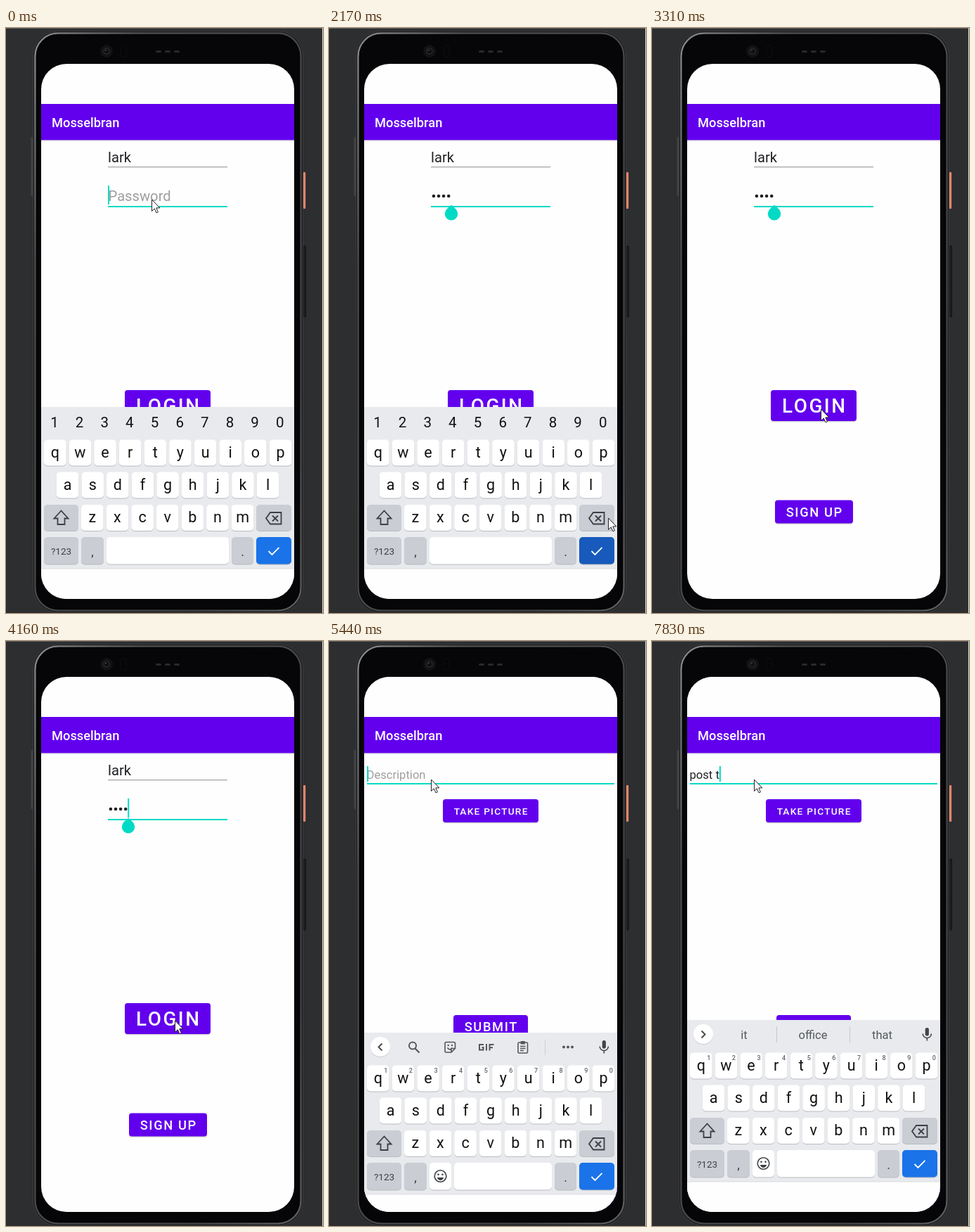
An HTML page that plays this animation: 451 by 832 pixels, repeating every 7.99 s.

```html
<!DOCTYPE html>
<html lang="en">
<head>
<meta charset="utf-8">
<title>Phone login and post</title>
<style>
  html, body { margin: 0; width: 100%; height: 100%; overflow: hidden; background: #2d2e30; }
  svg { display: block; width: 451px; height: 832px; }
  text { font-family: Roboto, "Noto Sans", sans-serif; white-space: pre; }
</style>
</head>
<body>
<svg id="stage" viewBox="0 0 451 832" xmlns="http://www.w3.org/2000/svg">
  <defs>
    <clipPath id="glass"><rect x="50" y="51" width="360" height="761" rx="36"/></clipPath>
    <linearGradient id="rim" x1="0" x2="1" y1="0" y2="1">
      <stop offset="0" stop-color="#8a8b8d"/><stop offset=".2" stop-color="#4c4d4f"/>
      <stop offset=".8" stop-color="#414244"/><stop offset="1" stop-color="#5c5d5f"/>
    </linearGradient>
    <linearGradient id="shade" x1="0" x2="0" y1="0" y2="1">
      <stop offset="0" stop-color="#000" stop-opacity=".14"/><stop offset="1" stop-color="#000" stop-opacity="0"/>
    </linearGradient>
  </defs>
</svg>
<script>
const LOOP = 7990;
const PURPLE = '#6200ee', TEAL = '#03dac5', INK = '#202124', ICON = '#3c4043';
const stage = document.getElementById('stage');

function el(parent, tag, attrs = {}, text) {
  const node = document.createElementNS('http://www.w3.org/2000/svg', tag);
  for (const k in attrs) node.setAttribute(k, attrs[k]);
  if (text !== undefined) node.textContent = text;
  parent.appendChild(node);
  return node;
}
const group = (p, attrs) => el(p, 'g', attrs);
const rect = (p, x, y, width, height, fill, rx = 0, more = {}) =>
  el(p, 'rect', { x, y, width, height, fill, rx, ...more });
const disc = (p, cx, cy, r, fill) => el(p, 'circle', { cx, cy, r, fill });
const line = (p, d, stroke = ICON, width = 1.8) =>
  el(p, 'path', { d, fill: 'none', stroke, 'stroke-width': width });
const label = (p, x, y, size, fill, text, more = {}) =>
  el(p, 'text', { x, y, 'font-size': size, fill, ...more }, text);
const centered = (p, x, y, size, fill, text, more = {}) =>
  label(p, x, y, size, fill, text, { 'text-anchor': 'middle', ...more });
const show = (node, on) => node.setAttribute('visibility', on ? 'inherit' : 'hidden');

// Phone body
function ring(inset, stroke, width, fill = 'none') {
  rect(stage, 38 + inset, 4 + inset, 385 - 2 * inset, 828 - 2 * inset, fill, 36 - inset,
    { stroke, 'stroke-width': width });
}
function drawPhone() {
  rect(stage, 0, 0, 451, 832, '#2d2e30');
  rect(stage, 0, 0, 451, 1, '#5d5e60');
  rect(stage, 450, 0, 1, 832, '#d8d8d8');
  rect(stage, 35.5, 155, 2.5, 84, '#424345', 1);
  rect(stage, 423, 205, 3.2, 52, '#e2846b', 1);
  rect(stage, 423, 310, 3.5, 101, '#1f1f21', 1, { stroke: '#121213' });
  ring(.5, '#3b3c3e', 1, '#1a1a1b');
  ring(3.5, 'url(#rim)', 2.5);
  ring(5.5, '#050506', 1.5, '#060608');
  disc(stage, 143, 33, 9, '#121213');
  disc(stage, 143, 33, 5, '#232427');
  disc(stage, 143, 33, 3, '#0b0b0d');
  disc(stage, 142, 32, 1, '#4b4d51');
  rect(stage, 163, 25, 8, 16, 'none', 3, { stroke: '#0f0f11' });
  for (let i = 0; i < 3; i++) rect(stage, 213 + i * 13, 32, 8, 3, '#29292b', 1.5);
}

function button(p, x, y, w, h, size, text) {
  rect(p, x, y + 1.5, w, h, '#000', 4, { opacity: .16 });
  rect(p, x, y, w, h, PURPLE, 4);
  const gap = size * .0893;
  centered(p, x + w / 2 + gap / 2, y + h / 2 + size * .356 + .4, size, '#fff', text,
    { 'font-weight': 500, 'letter-spacing': gap });
}

function page() {
  const g = group(screen);
  rect(g, 50, 51, 360, 761, '#fefefe');
  rect(g, 50, 159, 360, 3, 'url(#shade)');
  rect(g, 50, 108, 360, 51.4, PURPLE);
  label(g, 65, 141, 18.3, '#fff', 'Mosselbran', { 'font-weight': 500 });
  return g;
}

drawPhone();
const screen = group(stage, { 'clip-path': 'url(#glass)' });

// Login page
const login = page();
label(login, 145, 190.5, 20.2, INK, 'lark');
rect(login, 145, 197, 170, 1.3, '#a6a6a6');
const passHint = label(login, 145.5, 246, 20.2, '#9e9e9e', 'Password');
const dots = [0, 1, 2, 3].map(i => disc(login, 148.9 + i * 7.1, 239, 2.3, INK));
rect(login, 145, 253, 170, 2, TEAL);
const passCaret = rect(login, 145, 224, 2, 27, TEAL);
button(login, 169, 515, 122, 44, 27.8, 'LOGIN');
button(login, 175, 671.4, 111, 33.2, 18.3, 'SIGN UP');
const ripple = rect(login, 169, 515, 122, 44, '#fff', 4, { opacity: .22 });
const handle = el(login, 'path', { d: 'M174 251.5 L180.4 257.6 A9.2 9.2 0 1 1 167.6 257.6 Z', fill: TEAL });

// Post page
const post = page();
const descHint = label(post, 53.5, 196, 16.6, '#777', 'Description');
const descText = label(post, 53.5, 196, 16.6, INK, '');
const composing = rect(post, 54, 199, 0, 1, INK);
rect(post, 54, 202, 352, 2, TEAL);
const descCaret = rect(post, 54, 178, 2, 22, TEAL);
button(post, 162, 225, 136, 33, 13.7, 'TAKE PICTURE');
button(post, 177, 532, 106, 33, 18.3, 'SUBMIT');
button(post, 319, 773, 92, 33.5, 12.9, 'LOG OUT');

// Keyboard
const board = group(screen);
const PITCH = 35.63;
rect(board, 50, 539, 360, 230, '#e8eaed');
rect(board, 50, 769, 360, 300, '#fefefe');
rect(board, 50, 768.5, 360, 1, '#dcdee1');

function key(p, x, y, w, h = 37, fill = '#fff') {
  rect(p, x, y + 1, w, h, '#b9bcc1', 5);
  return rect(p, x, y, w, h, fill, 5);
}
function row(chars, x, y) {
  [...chars].forEach((c, i) => {
    key(board, x + i * PITCH, y, 31.6);
    centered(board, x + 15.8 + i * PITCH, y + 25, 21.5, '#111', c);
  });
}
const GRAY = '#cacdd4';
row('qwertyuiop', 54, 585.5);
row('asdfghjkl', 71.8, 631.5);
row('zxcvbnm', 107, 678);
key(board, 54, 678, 49, 37, GRAY);
line(board, 'M78.5 686.5 L68.5 697.5 H73.5 V706 H83.5 V697.5 H88.5 Z');
key(board, 356, 678, 50, 37, GRAY);
line(board, 'M376 689 H391.5 V705.5 H376 L370 697.2 Z M379 693.5 L387 701.5 M387 693.5 L379 701.5');
key(board, 54, 724, 49, 38.5, GRAY);
centered(board, 78.5, 748.5, 13.5, ICON, '?123');
key(board, 107, 724, 32, 38.5, GRAY);
centered(board, 123, 751, 18, ICON, ',');
key(board, 321, 724, 31, 38.5, GRAY);
centered(board, 336.5, 751, 18, ICON, '.');
const enter = key(board, 356, 724, 50, 38.5, '#1a73e8');
line(board, 'M373.5 744 L378.5 749 L388.5 738.8', '#fff');

const digits = group(board);
const smart = group(board);
key(digits, 143, 724, 174, 38.5);
key(smart, 143, 724, 31, 38.5);
key(smart, 178, 724, 139, 38.5);
[...'1234567890'].forEach((c, i) => {
  centered(digits, 69 + i * PITCH, 568, 20.5, '#111', c);
  centered(smart, 80.7 + i * PITCH, 595.5, 9, '#5f6368', c, { 'font-weight': 500 });
});
el(smart, 'circle', { cx: 158.5, cy: 743, r: 8.3, fill: 'none', stroke: ICON, 'stroke-width': 1.6 });
disc(smart, 155.5, 740.8, 1.3, ICON);
disc(smart, 161.5, 740.8, 1.3, ICON);
el(smart, 'path', { d: 'M153.8 745 H163.2 Q161.8 749 158.5 749 T153.8 745 Z', fill: ICON });

rect(smart, 59, 546, 28, 28, '#c8cbd0', 14);
disc(smart, 73, 559, 14, '#fff');
const chevron = line(smart, '', '#444');
rect(smart, 388.7, 550, 5.2, 11.5, '#444', 2.6);
line(smart, 'M385.2 558.5 A6.1 6.1 0 0 0 397.4 558.5 M391.3 564.5 V568.5', '#444', 1.6);

const tools = group(smart);
const TOOL = '#54575b';
el(tools, 'circle', { cx: 119, cy: 557.5, r: 5, fill: 'none', stroke: TOOL, 'stroke-width': 2 });
line(tools, 'M122.5 561.5 L128.5 567.5', TOOL, 2.2);
line(tools, 'M167 552.5 H177.5 Q179.5 552.5 179.5 554.5 V561.5 L174 567 H167 Q165 567 165 565 V554.5 Q165 552.5 167 552.5 Z M168.5 560.5 Q172 565.5 175.5 560.5 M179.5 561.5 H174 V567', TOOL, 1.6);
disc(tools, 169.7, 557, 1.2, TOOL);
disc(tools, 175, 557, 1.2, TOOL);
line(tools, 'M220 556 H214 V563.5 H219.5 V560 H217.5 M224 555 V564.5 M228.5 564.5 V556 H234.5 M228.5 560.3 H233', TOOL, 2);
rect(tools, 269, 553, 13.5, 15, 'none', 1.5, { stroke: TOOL, 'stroke-width': 1.6 });
rect(tools, 272.5, 551, 6.5, 4.5, TOOL, 1);
line(tools, 'M272 558.5 H279.5 M272 561.5 H279.5 M272 564.5 H277', TOOL, 1.3);
line(tools, 'M307.5 549 V571', '#cdd0d4', 1);
[334, 340, 346].forEach(x => disc(tools, x, 559.5, 2, TOOL));

const words = group(smart);
line(words, 'M177.5 548 V571 M281.5 548 V571', '#c6c9cd', 1);
const guesses = [131, 229, 327.5].map(x => centered(words, x, 566, 16.5, '#55585c', ''));

// Mouse pointer
const mouse = el(stage, 'path', {
  d: 'M.5 .5 V17 L4.3 13.4 L7 19.4 L9.4 18.3 L6.8 12.4 H11.8 Z',
  fill: '#fff', stroke: '#222', 'stroke-width': 1
});

// The picture only changes on these beats: [first, last, count]
const beats = [[0, 0, 1], [150, 1110, 8], [1230, 2170, 8], [2310, 3310, 9], [3740, 4730, 8],
  [4890, 5560, 6], [5990, 5990, 1], [6570, 6570, 1], [6870, 7530, 6], [7830, 7830, 1]]
  .flatMap(([a, b, n]) => Array.from({ length: n }, (_, i) => Math.round(a + (b - a) * i / Math.max(1, n - 1))));

const mousePath = [[0, 207, 243.5], [150, 207, 243.5], [430, 225, 304], [840, 225, 304], [1230, 214, 250],
  [1370, 214, 250], [1900, 393, 748], [2040, 397, 740], [2170, 397, 696.5], [2310, 396, 690],
  [2935, 262, 556], [3310, 240, 541.5], [3740, 240, 539.5], [4310, 240, 539],
  [4450, 214, 420], [4590, 170, 262], [4730, 147, 200], [4890, 145, 191.5], [5160, 145, 196.5]];
const typing = [[0, ''], [7000, 'p', 'pay', 'people', 'put'], [7130, 'po', 'pot', 'point', 'post'],
  [7260, 'pos', 'pose', 'post', 'posted'], [7520, 'post', 'posts', 'post', 'posted'],
  [7830, 'post t', 'it', 'office', 'that']];
// Keyboard: [time, offset, opacity]
const slide = [[0, 0, 1], [2310, 18, .5], [2430, 0, 0], [5150, 170, 1], [5290, 70, 1], [5420, 18, 1], [5550, 0, 1]];

const latest = (table, t) => table.findLast(r => r[0] <= t);
const within = (t, ...spans) => spans.some(([a, b]) => t >= a && t < b);

function along(path, t) {
  const i = path.findIndex(p => p[0] > t);
  if (i < 0) return path.at(-1).slice(1);
  const [a, b] = [path[i - 1], path[i]];
  const k = (t - a[0]) / (b[0] - a[0]);
  return [a[1] + (b[1] - a[1]) * k, a[2] + (b[2] - a[2]) * k];
}

function render(now) {
  const t = beats.findLast(b => b <= now);

  const count = [420, 560, 690, 830].filter(s => t >= s).length;
  show(passHint, !count);
  dots.forEach((d, i) => show(d, i < count));
  passCaret.setAttribute('x', count ? 144.8 + count * 7.1 : 145);
  show(passCaret, within(t, [0, 1760], [2430, 2900], [3740, 4300]));
  show(handle, t >= 1360);
  show(ripple, within(t, [4300, 4700]));

  show(post, t >= 4580);
  post.setAttribute('opacity', t < 4700 ? .55 : 1);
  post.setAttribute('transform', `translate(0 ${t < 4700 ? 24 : 0})`);

  const [, text, ...hints] = latest(typing, t);
  descHint.setAttribute('fill', t < 5150 ? '#777' : '#9e9e9e');
  show(descHint, !text);
  descText.textContent = text;
  const width = text ? descText.getComputedTextLength() : 0;
  composing.setAttribute('width', t < 7830 ? width : 0);
  descCaret.setAttribute('x', text ? 53.5 + width : 54);
  show(descCaret, within(t, [5150, 5550], [5990, 6570], [6870, LOOP]));

  const [, dy, alpha] = latest(slide, t);
  board.setAttribute('transform', `translate(0 ${dy})`);
  board.setAttribute('opacity', alpha);
  show(digits, t < 4800);
  show(smart, t >= 4800);
  enter.setAttribute('fill', within(t, [1890, 2310]) ? '#185abc' : '#1a73e8');
  const open = t < 6870;
  show(tools, open);
  show(words, !open);
  chevron.setAttribute('d', open ? 'M75.5 554.5 L70.5 559.5 L75.5 564.5' : 'M70.5 554.5 L75.5 559.5 L70.5 564.5');
  guesses.forEach((g, i) => { g.textContent = hints[i] || ''; });

  const [x, y] = along(mousePath, t);
  mouse.setAttribute('transform', `translate(${x} ${y})`);
}

const start = performance.now();
function tick() {
  render((performance.now() - start) % LOOP);
  requestAnimationFrame(tick);
}
tick();
</script>
</body>
</html>
```
